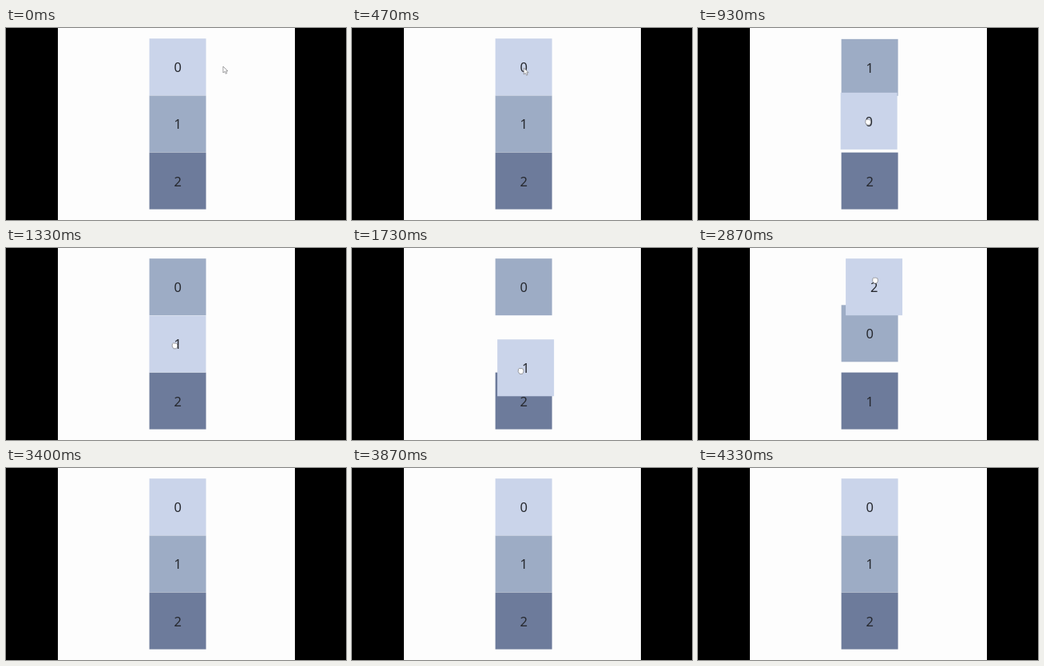
These frames come from a looping animation (426x240 px, 4390 ms). An HTML page:

```html
<!DOCTYPE html>
<html lang="en">
<head>
<meta charset="utf-8">
<title>Sortable list</title>
<style>
html, body { margin: 0; width: 100%; height: 100%; overflow: hidden; background: #000; }
#page { position: absolute; left: 65px; top: 0; width: 297px; height: 240px; overflow: hidden; background: #fdfdfd; }
.box {
  position: absolute; left: 0; top: 0; width: 71.2px; height: 71.2px;
  font: 16.5px/72.4px "Noto Sans", "Open Sans", sans-serif; text-align: center; color: #26282e;
}
svg { position: absolute; left: 0; top: 0; overflow: visible; fill: #fff; stroke: #77777a; stroke-width: .7; }
</style>
</head>
<body>
<div id="page">
  <div class="box" style="background:#9dacc5"></div>
  <div class="box" style="background:#6d7b9b"></div>
  <div class="box" style="background:#cad4ea"></div>
  <svg id="cursor" width="8" height="10">
    <path id="arrow" d="M0 0V8L2 6.3L3.4 9.2L4.8 8.5L3.5 5.8H6Z"/>
    <path id="fist" d="M-3 -2.5Q-1.8 -4.2 -.5 -3Q.5 -4 1.5 -3Q3.2 -3.4 3.3 -1V1L2 3.5H-1.5L-3.3 .7Z"/>
  </svg>
</div>
<script>
const LOOP = 4390, SLOT = 71.2, LEFT = 114.6, TOP = 13.2, SETTLE = 182;
const ENTRY = [207, 48], EXIT = [185, -12];

// The light box is dragged between slots; x, y is where the pointer grabs it
const drags = [
  { start: 520, end: 1000, from: 0, to: 1, drift: -1, x: 149, y: 50 },
  { start: 1530, end: 1978, from: 1, to: 2, drift: 6, x: 144, y: 124 },
  { start: 2487, end: 2867, from: 2, to: 0, drift: 5.5, x: 151.5, y: 183 }
];
const boxes = [...document.querySelectorAll(".box")];
const light = boxes.length - 1;

function ease(t, start, span) {
  const u = Math.min(1, Math.max(0, (t - start) / span));
  return (1 - Math.cos(Math.PI * u)) / 2;
}
const mix = (a, b, k) => a.map((v, i) => v + (b[i] - v) * k);
const place = (el, [x, y]) => el.style.transform = `translate(${x}px, ${y}px)`;

function scene(t) {
  const slots = [1, 2, 0];
  let labels = [...slots], shift = 0, pointer = ENTRY, drop = 0;
  for (const { start, end, from, to, drift, x, y } of drags) {
    const span = end - start, step = to - from;
    const p = ease(t, start, span);
    pointer = mix(pointer, [x, y], ease(t, drop, start - drop));
    pointer = [pointer[0] + drift * p, pointer[1] + step * SLOT * p];
    if (t < start) break;

    drop = end + SETTLE;
    shift = drift * p * (1 - ease(t, drop, SETTLE));
    slots.forEach((slot, i) => {
      if (i === light) {
        slots[i] += step * p;
      } else if ((slot - from) * step > 0 && Math.abs(slot - from) <= Math.abs(step)) {
        // Neighbours make room once the dragged box is halfway over them
        const half = (Math.abs(slot - from) - .5) / Math.abs(step);
        const passed = start + span * Math.acos(1 - 2 * half) / Math.PI;
        slots[i] -= Math.sign(step) * ease(t, passed, SETTLE);
      }
    });
    if (t < drop) break;
    labels = slots.map(Math.round);
    slots.splice(0, slots.length, ...labels);
  }
  const last = drags.at(-1).end + SETTLE;
  pointer = mix(pointer, EXIT, ease(t, last, 300));
  return { slots, labels, shift, pointer, held: t > drags[0].start && t < last };
}

function draw(now) {
  const { slots, labels, shift, pointer, held } = scene(now % LOOP);
  boxes.forEach((box, i) => {
    place(box, [LEFT + (i === light ? shift : 0), TOP + slots[i] * SLOT]);
    box.textContent = labels[i];
  });
  place(cursor, pointer);
  arrow.style.display = held ? "none" : "";
  fist.style.display = held ? "" : "none";
  requestAnimationFrame(draw);
}
requestAnimationFrame(draw);
</script>
</body>
</html>
```
